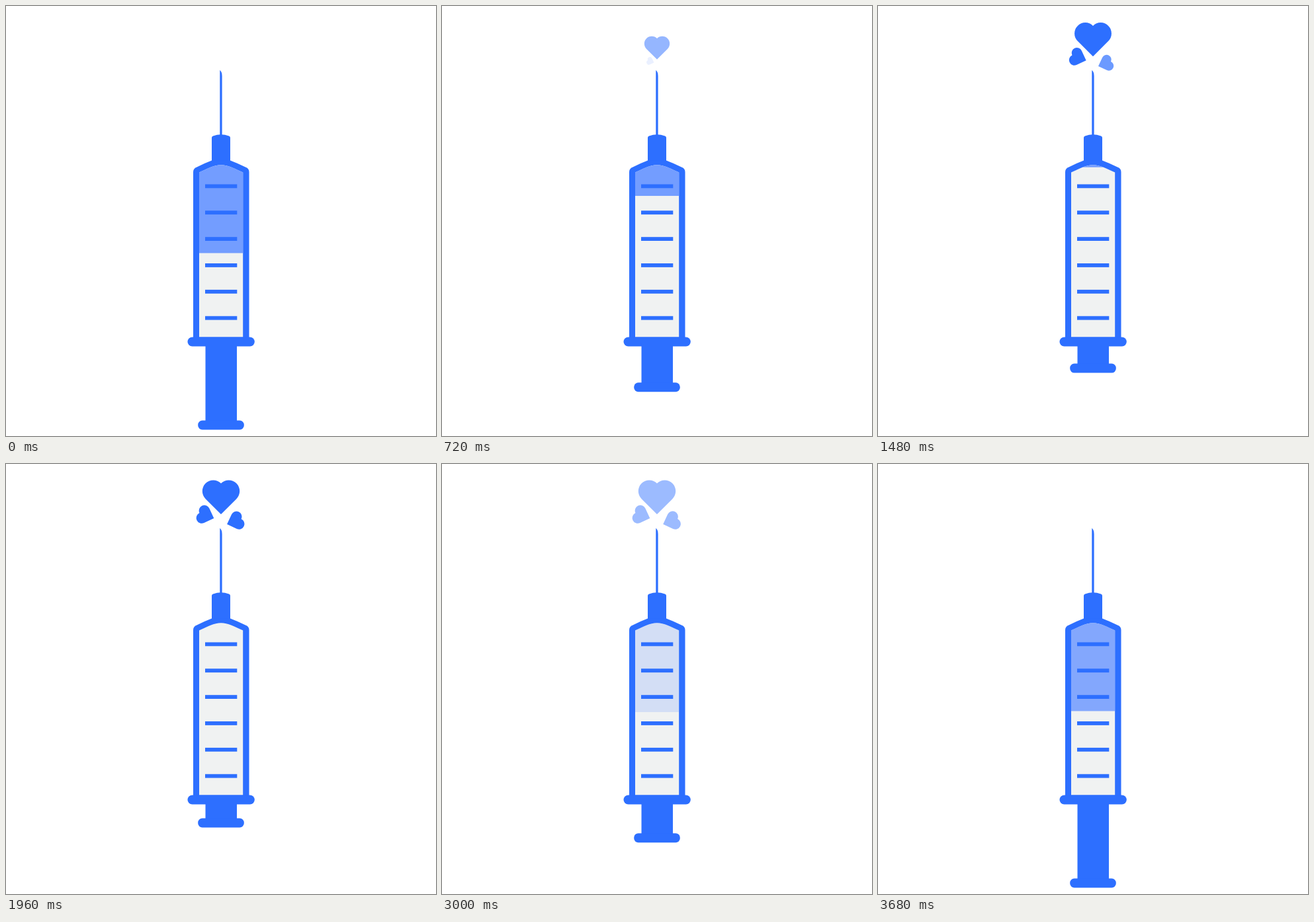
These frames come from a looping animation (650x650 px, 3.84 s). An HTML page with a canvas:

```html
<!DOCTYPE html>
<html lang="en">
<head>
<meta charset="utf-8">
<title>Syringe with hearts</title>
<style>
html, body { margin: 0; width: 100%; height: 100%; overflow: hidden; background: #fff; }
canvas { display: block; width: 650px; height: 650px; }
</style>
</head>
<body>
<canvas id="stage" width="650" height="650"></canvas>
<script>
const ctx = document.getElementById('stage').getContext('2d');
const LOOP = 3840, STEP = 40;
const BLUE = '#2d6fff', LIQUID = '#739dff', GLASS = '#f0f2f2';
const TRAVEL = 92, CX = 325;

// tip position, pivot of the growth, angle, size, growth and fade-in times
const HEARTS = [
  { tip: [325, 76], pivot: [325, 91], turn: 0, size: 1, grow: [280, 1420], fade: [240, 1200] },
  { tip: [314.3, 82], pivot: [325, 88], turn: -70, size: 0.5, grow: [435, 1450], fade: [640, 1440] },
  { tip: [334.2, 91], pivot: [325, 91], turn: 70, size: 0.5, grow: [748, 1480], fade: [970, 1700] }
];

const ramp = (t, from, to) => Math.min(1, Math.max(0, (t - from) / (to - from)));

// cubic timing curve whose control points lie at y = 0 and y = 1
function ease(u, x1, x2) {
  if (u <= 0 || u >= 1) return u <= 0 ? 0 : 1;
  let lo = 0, hi = 1, s = 0.5;
  for (let i = 0; i < 30; i++) {
    s = (lo + hi) / 2;
    const r = 1 - s;
    const x = 3 * r * r * s * x1 + 3 * r * s * s * x2 + s * s * s;
    if (x < u) lo = s; else hi = s;
  }
  return s * s * (3 - 2 * s);
}

const glide = (t, start, length) => ease(ramp(t, start, start + length), 0.26, 0);

function pill(x, y, w, h, r) {
  ctx.beginPath();
  ctx.roundRect(x, y, w, h, r);
  ctx.fill();
}

function drawHeart(h, t) {
  const alpha = ramp(t, ...h.fade) * (1 - ramp(t, 2660, 3300));
  const scale = glide(t, ...h.grow);
  if (alpha <= 0 || scale <= 0) return;
  const [px, py] = h.pivot;
  const q = Math.PI / 4;
  ctx.save();
  ctx.globalAlpha = alpha;
  ctx.fillStyle = BLUE;
  ctx.translate(px, py);
  ctx.scale(scale, scale);
  ctx.translate(h.tip[0] - px, h.tip[1] - py);
  ctx.rotate(h.turn * Math.PI / 180);
  ctx.scale(h.size, h.size);
  ctx.beginPath();
  ctx.moveTo(0, 0);
  ctx.arc(-11.7, -35, 16.5, 3 * q, 7 * q);
  ctx.arc(11.7, -35, 16.5, 5 * q, 9 * q);
  ctx.closePath();
  ctx.fill();
  ctx.restore();
}

function glassPath() {
  ctx.beginPath();
  ctx.moveTo(292, 500.5);
  ctx.lineTo(292, 251.5);
  ctx.bezierCurveTo(304, 246, 315, 240.3, CX, 240.3);
  ctx.bezierCurveTo(335, 240.3, 346, 246, 358.2, 251.5);
  ctx.lineTo(358.2, 500.5);
  ctx.closePath();
}

function drawNeedle() {
  ctx.beginPath();
  ctx.moveTo(323.3, 97);
  ctx.quadraticCurveTo(326.6, 99.5, 326.6, 106);
  ctx.lineTo(326.6, 196);
  ctx.lineTo(323.3, 196);
  ctx.closePath();
  ctx.fill();

  ctx.beginPath();
  ctx.moveTo(311, 199);
  ctx.quadraticCurveTo(311, 197, 313, 196.5);
  ctx.quadraticCurveTo(CX, 191.8, 337, 196.5);
  ctx.quadraticCurveTo(339, 197, 339, 199);
  ctx.lineTo(339, 240);
  ctx.lineTo(311, 240);
  ctx.closePath();
  ctx.fill();
}

function drawBarrel(level, alpha) {
  ctx.beginPath();
  ctx.moveTo(283, 505);
  ctx.lineTo(283, 251);
  ctx.quadraticCurveTo(283, 246.5, 287, 244.3);
  ctx.quadraticCurveTo(299, 238, 311, 233.5);
  ctx.lineTo(339, 233.5);
  ctx.quadraticCurveTo(351, 238, 363.5, 244.3);
  ctx.quadraticCurveTo(367.5, 246.5, 367.5, 251);
  ctx.lineTo(367.5, 505);
  ctx.closePath();
  ctx.fill();

  glassPath();
  ctx.fillStyle = GLASS;
  ctx.fill();
  if (alpha > 0 && level > 240) {
    ctx.save();
    glassPath();
    ctx.clip();
    ctx.globalAlpha = alpha;
    ctx.fillStyle = LIQUID;
    ctx.fillRect(290, 236, 70, level - 236);
    ctx.restore();
  }
  ctx.fillStyle = BLUE;
  for (let i = 0; i < 6; i++) ctx.fillRect(301, 269.5 + i * 39.85, 48.3, 5.8);
}

function draw(t) {
  const push = glide(t, 100, 2240);
  const back = ease(ramp(t, 2640, 3665), 0.42, 0.58);
  const lift = TRAVEL * (push - back);
  const refill = t > 2640;
  const alpha = refill ? ramp(t, 2752, 3819) : 1;
  const level = refill ? 375 - 1.5 * ramp(t, 3200, 3680) : 373.5 - 1.51 * lift;

  ctx.fillStyle = '#fff';
  ctx.fillRect(0, 0, 650, 650);
  HEARTS.forEach(h => drawHeart(h, t));
  ctx.fillStyle = BLUE;
  drawNeedle();
  drawBarrel(level, alpha);
  pill(274.5, 500.5, 101.3, 14, 7);
  ctx.fillRect(301.5, 510, 47.5, 122 - lift);
  pill(290.2, 626.5 - lift, 69.6, 14, 6.5);
}

function pose(ms) {
  const t = Math.floor((ms % LOOP) / STEP) * STEP;
  return t < 160 ? 0 : Math.min(t, 3680);
}

const begin = performance.now();
function tick() {
  draw(pose(performance.now() - begin));
  requestAnimationFrame(tick);
}
tick();
</script>
</body>
</html>
```
